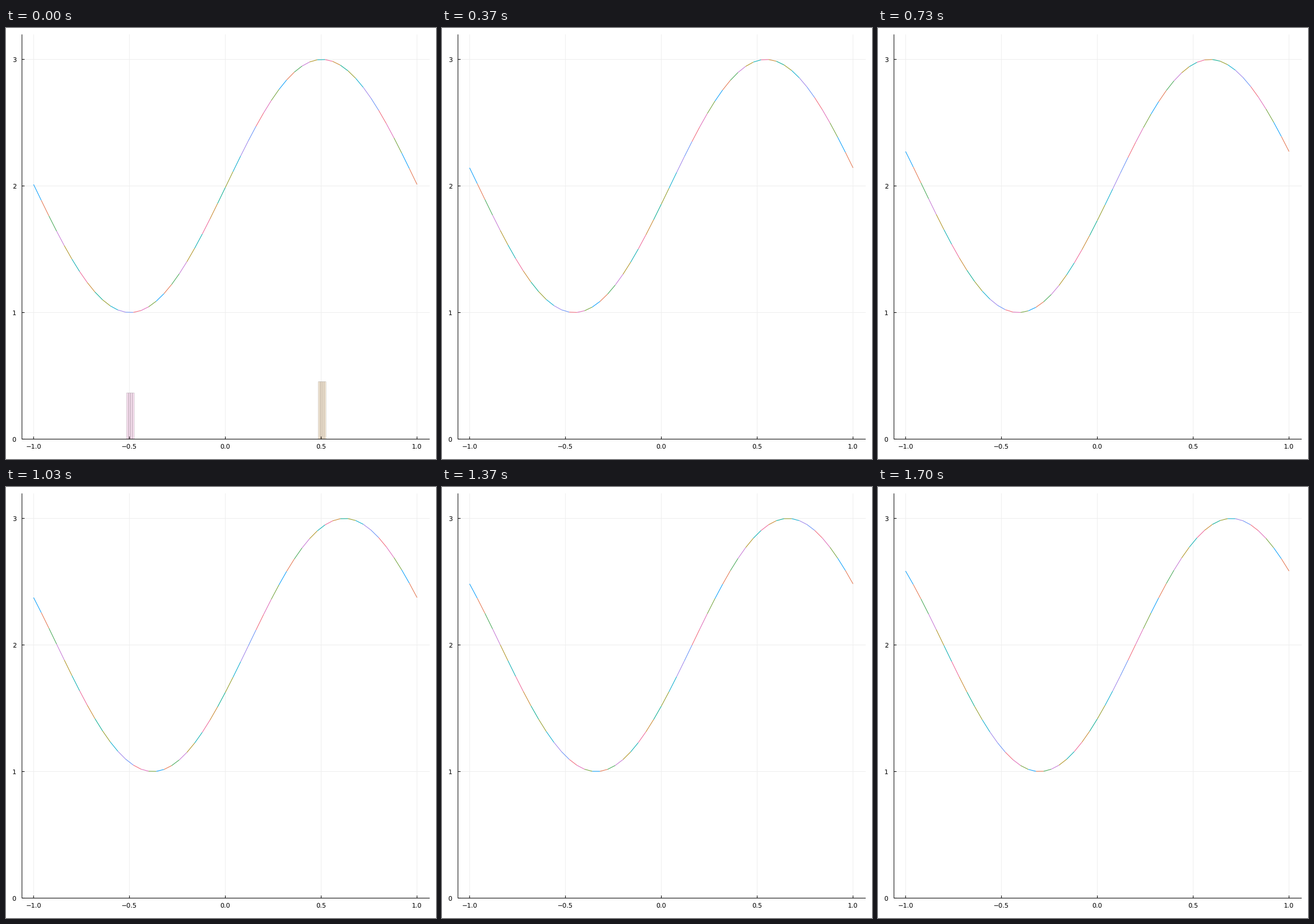
A matplotlib script for the animation above (1.73 s loop, 748x749 px).

```python
import numpy as np
import matplotlib.pyplot as plt
from matplotlib.animation import FuncAnimation
from matplotlib.collections import LineCollection
from matplotlib.patches import Rectangle

W, H, DPI = 748, 749, 100
PX = 72 / DPI              # one pixel in points
TICKS, INTERVAL = 173, 10  # 1730 ms loop
PHASE_STEP = 0.012
PALETTE = ["#009AFA", "#E36F47", "#3EA44E", "#C371D2", "#AC8E18", "#00AAAE",
           "#ED5E93", "#C68225", "#00A98D", "#8E971E", "#00A9CC", "#9B7FE9",
           "#618DF6", "#F06073", "#DD65B6", "#6C9F33"]
LEFT, RIGHT, TOP = 27.8, 737, 11.2

plt.rcParams["text.hinting"] = "none"


def px(x):
    return 381.5 + 333.5 * x


def py(y):
    return 714.45 - 219.95 * y


fig = plt.figure(figsize=(W / DPI, H / DPI), dpi=DPI, facecolor="white")
ax = fig.add_axes([0, 0, 1, 1])
ax.set_xlim(0, W)
ax.set_ylim(H, 0)
ax.axis("off")


def line(x0, y0, x1, y1, color, z):
    ax.plot([x0, x1], [y0, y1], color=color, lw=PX, zorder=z,
            solid_capstyle="butt", snap=False)


def label(x, y, text, ha):
    ax.text(x, y, text, ha=ha, va="center_baseline", fontsize=8,
            family="DejaVu Sans", color="black")


BASE = py(0)
for v in (-1.0, -0.5, 0.0, 0.5, 1.0):
    line(px(v), TOP, px(v), BASE, "#eeeeee", 1)
    line(px(v), BASE, px(v), BASE - 4.5, "black", 5)
    label(px(v), 727, f"{v:.1f}".replace("-", "\u2212"), "center")
for v in range(4):
    if v:
        line(LEFT, py(v), RIGHT, py(v), "#eeeeee", 1)
    line(LEFT, py(v), LEFT + 4.5, py(v), "black", 5)
    label(17.8, py(v), str(v), "right")
line(LEFT, TOP, LEFT, BASE, "black", 5)
line(LEFT, BASE, RIGHT, BASE, "black", 5)

# Short-lived bars below the trough and the crest
bars = []
for center, height, color in ((-0.495, 0.365, "#DD65B6"),
                              (0.505, 0.454, "#C68225")):
    for i in range(4):
        x = px(center + 0.01 * (i - 2))
        bar = Rectangle((x, BASE), px(0.01) - px(0), py(height) - BASE,
                        facecolor=color + "33", edgecolor=(0, 0, 0, 0.15),
                        lw=PX, zorder=2, snap=False)
        bars.append(ax.add_patch(bar))

xs = np.linspace(-1, 1, 51)
wave = LineCollection([], lw=PX, zorder=3, capstyle="butt",
                      colors=[PALETTE[i % 16] for i in range(50)])
ax.add_collection(wave, autolim=False)


def update(tick):
    step = (3 * tick + 1) // 10  # about 30 steps per second
    ys = 2 + np.sin(np.pi * xs - PHASE_STEP * (step + 1))
    pts = np.column_stack([px(xs), py(ys)])
    wave.set_segments(np.stack([pts[:-1], pts[1:]], axis=1))
    for bar in bars:
        bar.set_visible(step == 0)
    return [wave, *bars]


anim = FuncAnimation(fig, update, frames=TICKS, interval=INTERVAL,
                     repeat=True, repeat_delay=0, blit=False)
plt.show()
```
